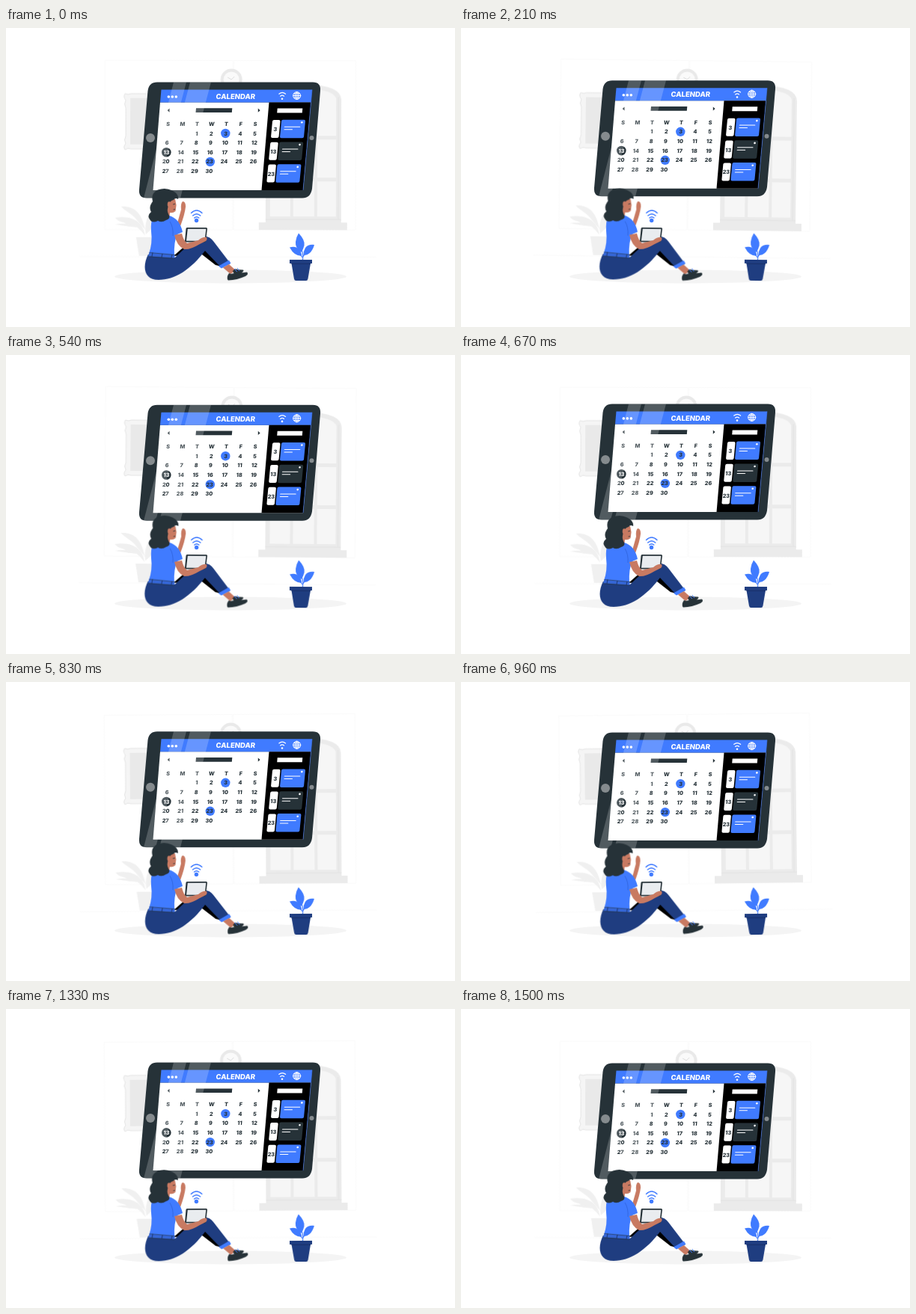
These frames come from a looping animation (600 px wide and 400 px high, 1.54 s). An HTML page:

```html
<!DOCTYPE html>
<html lang="en">
<head>
<meta charset="utf-8">
<title>Calendar</title>
<style>
  html, body { margin: 0; height: 100%; overflow: hidden; background: #fff; }
  svg { display: block; width: 600px; height: 400px; }
  text { font: 800 7.3px Inter, "Open Sans", sans-serif; text-anchor: middle; fill: #263238; }
  .title { font-size: 9.5px; fill: #fff; }
  .dark { fill: #263238; }
  .blue { fill: #407bff; }
  .navy { fill: #1f3d80; }
  .skin { fill: #c87a62; }
  .white { fill: #fff; }
  .line { fill: none; stroke: #fff; stroke-linecap: round; }

  /* 24 pictures a second, constant speed between the turning points */
  .float { animation: float 1540ms -9ms infinite; }
  .sway { animation: sway 1540ms -9ms infinite; }
  .room { transform-origin: 296px 175px; }
  .woman { transform-origin: 255px 275px; }
  .plant { transform-origin: 394px 306px; }
  @keyframes float {
    0%      { transform: translateY(0); animation-timing-function: steps(17); }
    45.946% { transform: translateY(-7.556px); animation-timing-function: steps(18); }
    94.595% { transform: translateY(.444px); animation-timing-function: steps(1); }
    97.297%, 100% { transform: translateY(0); }
  }
  @keyframes sway {
    0%      { transform: rotate(.111deg); animation-timing-function: steps(8); }
    21.622% { transform: rotate(1deg); animation-timing-function: steps(18); }
    70.27%  { transform: rotate(-1deg); animation-timing-function: steps(10); }
    97.297%, 100% { transform: rotate(.111deg); }
  }
</style>
</head>
<body>
<svg viewBox="0 0 600 400">
  <g class="sway room">
    <path d="M132 43.500H303V270H132ZM304 43.500H467V270H304ZM98 306H495" fill="none" stroke="#fafafa"/>
    <path d="M159 88q4 2 8 0h32v74h-32q-4-2-8 1q-3-4 1-8q-3-5 0-10v-38q-3-5 0-10q-4-5-1-9Z" fill="#f5f5f5" stroke="#e4e4e4"/>
    <path d="M166 94h30v62h-30Z" fill="#e9e9e9"/>
    <circle cx="301" cy="69" r="14.500" fill="#e9e9e9"/>
    <circle cx="301" cy="69" r="10.500" fill="#fafafa"/>
    <path d="M296 66l5 3 4-4" fill="none" stroke="#dcdcdc"/>
    <g fill="#ebebeb">
      <path d="M347 260V120Q350 76 398 75Q448 76 448 96V260Z"/>
      <path d="M338 260h118v10H338Z"/>
      <path d="M353 130h27v70h-27ZM384 130h28v70h-28ZM416 149h25v51h-25ZM353 205h27v47h-27ZM384 205h28v47h-28ZM416 205h25v47h-25ZM416 82q22 3 25 12v50h-25Z" fill="#f6f6f6"/>
      <path d="M347 256H448M444 92V256" fill="none" stroke="#e2e2e2"/>
    </g>
    <g fill="#f0f0f0">
      <path d="M186 278C184 262 172 250 146 254C152 262 160 258 164 266C172 262 178 268 186 278Z"/>
      <path d="M186 270C182 248 172 238 154 239C160 246 168 248 174 256Z"/>
      <path d="M187 276C184 258 192 244 206 238C204 254 202 264 187 276Z"/>
      <path d="M146 263q18-3 30 4q-18-2-30-4ZM174 280h27l-3 25h-20Z"/>
    </g>
  </g>
  <ellipse cx="300" cy="332.500" rx="155" ry="9" fill="#f4f4f4"/>

  <!-- big tablet -->
  <g class="float">
    <path class="dark" d="M202 72.500H410Q421 72.500 420 84L409 215Q407 227.500 396 227.500H188Q177 227.500 178 216L189.500 84Q191 72.500 202 72.500Z"/>
    <path class="white" d="M206 99.500H407.500L397 217H196.500Z"/>
    <path class="blue" d="M207.500 82.500H409L407.500 99.500H206Z"/>
    <path d="M351.500 99.500H407.500L397 217H341.500Z"/>
    <path d="M409 82.500L397 217" stroke="#407bff" stroke-width=".6"/>
    <circle cx="193" cy="147" r="6" fill="#858b8e"/>
    <circle cx="408.500" cy="147" r="3" fill="#858b8e"/>

    <g class="white">
      <circle cx="217.300" cy="92" r="1.800"/>
      <circle cx="222.300" cy="92" r="1.800"/>
      <circle cx="227.300" cy="92" r="1.800"/>
      <circle cx="369" cy="94.700" r="1.300"/>
      <path d="M362.700 107.500h33.600l-.5 6h-33.600Z"/>
    </g>
    <path class="line" stroke-width="1.200" d="M364.800 88.200q4.400-3.600 8.800 0M366.600 91.200q2.500-2 5 0"/>
    <g class="line" stroke-width="1">
      <circle cx="388.700" cy="90.500" r="5"/>
      <ellipse cx="388.700" cy="90.500" rx="2.300" ry="5"/>
      <path d="M383.700 90.500h10M388.700 85.500v10M384.700 87.800h8M384.700 93.200h8"/>
    </g>
    <text class="title" transform="translate(306.500 94.700) skewX(-5)">CALENDAR</text>

    <path class="dark" d="M254 107.300h48.300l-.5 5.700h-48.300ZM218.500 107.600v5.200l-2.800-2.600ZM336.800 107.600v5.200l2.800-2.600Z"/>
    <circle class="blue" cx="293.300" cy="141" r="6.200"/>
    <circle class="blue" cx="272.800" cy="179" r="6.200"/>
    <circle class="dark" cx="214.300" cy="166.300" r="6.300"/>
    <g id="grid"></g>
    <g id="cards" transform="translate(356.200 122.700) skewX(-5.400)"></g>

    <path d="M224 72.500H241L200 227.500H184ZM246 72.500H274L233 227.500H205Z" fill="#fff" opacity=".2"/>
  </g>

  <g class="sway woman">
    <path d="M224 305L242 289L262 287L288 319L280 317L262 303Z"/>
    <path class="skin" d="M229 261L234 243Q233 235 236 232Q240 232 240 239Q239 249 233 265Z"/>
    <path class="skin" d="M216 230L226 229L227.500 237L226.500 245Q223 248 219 247L218 256L208 257L212 236Z"/>
    <path class="blue" d="M197 254Q207 249 218 251Q232 255 236 273L229 276Q224 286 225 305L191 302Q196 288 194 272Q193 258 197 254Z"/>
    <path d="M219 259Q224 267 223 278" fill="none" stroke="#2f63d8" stroke-width=".8"/>
    <path class="dark" d="M196 232Q193 221 203 216.500Q213 213 222 217.500Q231 222 230 229Q226 226.500 224 230Q219 231 218 236Q214 243 217 249Q221 255 214 257Q208 261 203 258Q195 262 192 256Q188 251 194 246Q190 240 196 232Z"/>
    <ellipse class="skin" cx="218" cy="236" rx="2.300" ry="3.800"/>
    <path d="M223 236l3-.6M223.500 243l2.500-.5" stroke="#263238" stroke-width=".8"/>

    <path class="navy" d="M190 303L226 307Q244 289 260 280Q270 276 277 285L300 315L288 321L266 298C247 323 226 337 204 337C184 337 182 319 190 303Z"/>
    <path d="M191.500 300.500L226 303.500L225 308L190 305.500Z" fill="#3566d6"/>
    <path d="M196 300.500l-1 5.500M209 302l-1 5M222 303l-1 5" stroke="#1f3d80" stroke-width="1.200"/>
    <path d="M191.500 300.500L226 303.500M190.500 305.800L225 308.300" stroke="#263238" stroke-width=".6"/>
    <path class="blue" d="M284 318.500L298 310.500L300.500 314.500L288 321.500Z"/>
    <path class="skin" d="M290 320.500L298 316L307 324L300 329Z"/>
    <path class="dark" d="M303 325Q306 321 309 323L317 323.500Q320 326 306 331ZM298 328Q303 330 308 326Q313 328 322 326.500Q325 329 320 332Q309 337 297 337.500Q294 334 298 328Z"/>
    <path d="M305 322l4 4M309 321l3 4" stroke="#407bff"/>

    <path class="dark" d="M242 267H267.500Q269 267 269 268.500L267 285Q267 286.500 265 286.500H240Q238.500 286.500 239 285L240.500 268.500Q240.500 267 242 267Z"/>
    <path d="M242.800 268.700H267.300L265.500 284.800H241Z" fill="#e9ecef"/>
    <path class="skin" d="M225 277L235 275Q237 284 242 288L257 284Q263 279 268 280Q270 284 265 286L259 289Q246 297 238 296Q228 291 225 277Z"/>

    <path d="M247.500 247.500q7.200-7 14.400 0M249.700 251q5-4.600 10 0M251.700 254q3-2.600 6 0" fill="none" stroke="#407bff" stroke-width="1.500" stroke-linecap="round"/>
    <circle class="blue" cx="254.500" cy="257.500" r="2.700"/>
  </g>

  <g class="sway plant">
    <path d="M396.500 311Q398 301 393 291M397 306Q400 300 406 295M396 307Q391 298 384 294" fill="none" stroke="#407bff" stroke-width="1.100"/>
    <g class="blue">
      <path d="M391 274.500Q400 284 398.500 291Q397 297 394.500 300Q386 294 387 286Q388 279 391 274.500Z"/>
      <path d="M379 293.500Q387 291 391 296Q395.500 300 395 305Q385 305 379 293.500Z"/>
      <path d="M412 290Q404 289 400 294Q397 299 397.500 304Q408 304 412 290Z"/>
    </g>
    <path class="navy" d="M379 310H409V315H407L403.500 335.500Q403 338 401 338H387.500Q385.500 338 385 335.500L381.500 315H379Z"/>
    <path d="M381.500 315.500H407" stroke="#18306a"/>
  </g>
</svg>
<script>
  const NS = 'http://www.w3.org/2000/svg';

  function add(parent, tag, attrs, content = '') {
    const el = document.createElementNS(NS, tag);
    for (const key in attrs) el.setAttribute(key, attrs[key]);
    el.textContent = content;
    parent.append(el);
  }

  const grid = document.getElementById('grid');

  function cell(col, y, label) {
    const x = 216.3 + 19.45 * col - 0.055 * (y - 128.5);
    add(grid, 'text', {
      transform: `translate(${x} ${y + 2.6}) skewX(-5)`,
      style: label === 13 ? 'fill:#fff' : ''
    }, label);
  }

  [...'SMTWTFS'].forEach((d, col) => cell(col, 128.5, d));
  for (let day = 1; day <= 30; day++) {
    const slot = day + 1;
    cell(slot % 7, 141 + 12.6 * Math.floor(slot / 7), day);
  }

  const cards = document.getElementById('cards');
  [3, 13, 23].forEach((day, i) => {
    const y = 29.8 * i;
    add(cards, 'rect', { class: 'white', x: 0, y: y + 0.3, width: 10.5, height: 24, rx: 2 });
    add(cards, 'rect', { class: i === 1 ? 'dark' : 'blue', x: 12, y, width: 32, height: 24.5, rx: 2 });
    add(cards, 'text', { x: 5, y: y + 15.4 }, day);
    add(cards, 'path', { class: 'line', 'stroke-width': 1, d: `M17 ${y + 9.5}h20.5M17 ${y + 13}h10.5` });
    add(cards, 'circle', { class: 'white', cx: 39.5, cy: y + 3.6, r: 1.3 });
  });
</script>
</body>
</html>
```
